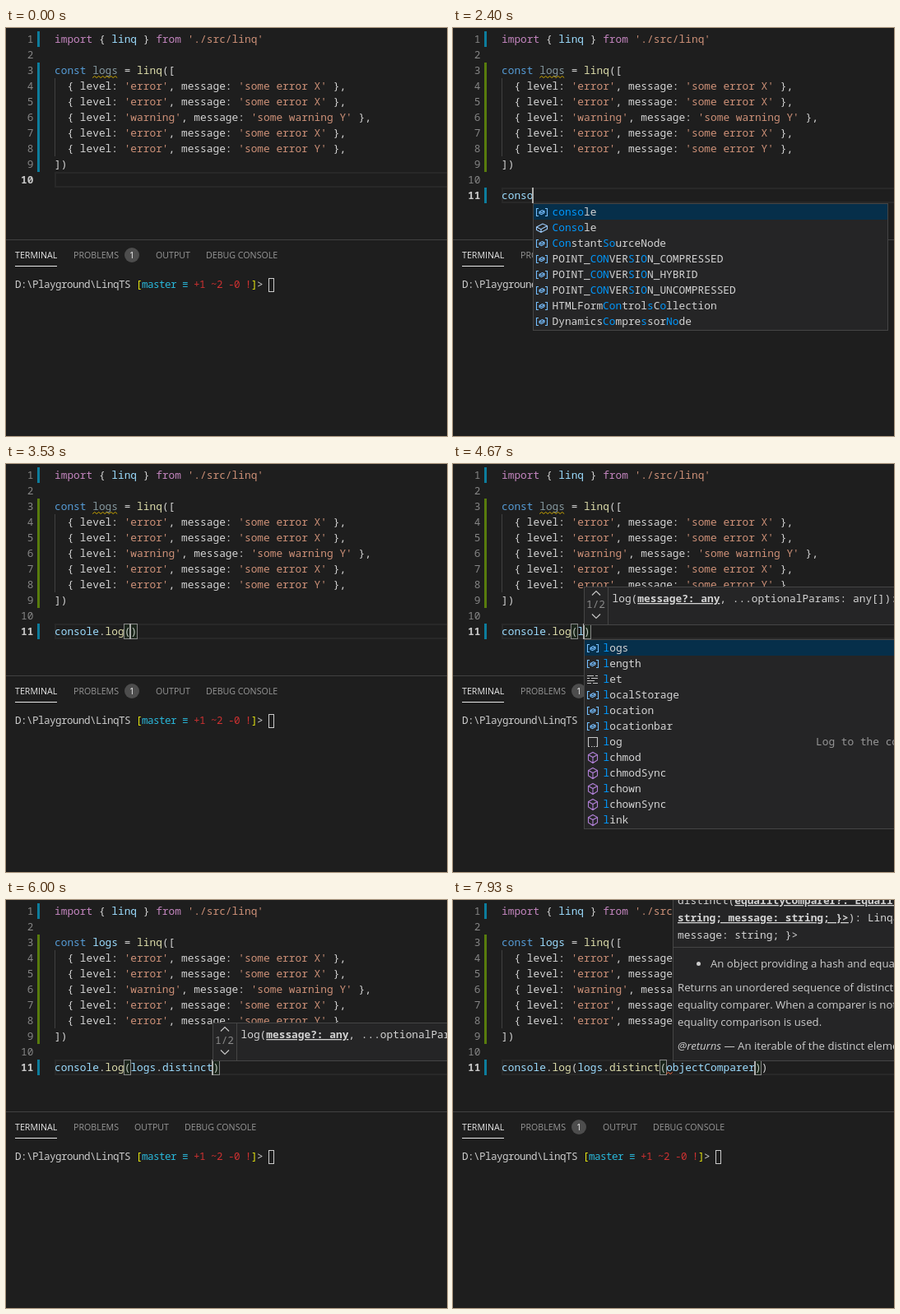
These frames come from a looping animation (536 px wide and 496 px high, 8000 ms). An HTML page:

```html
<!DOCTYPE html>
<html lang="en">
<head>
<meta charset="utf-8">
<title>Editor demo</title>
<style>
html, body { margin: 0; width: 100%; height: 100%; overflow: hidden; background: #1e1e1e; }
svg { display: block; }
text { white-space: pre; font: 12.83px "Noto Sans Mono", "DejaVu Sans Mono", monospace; fill: #d4d4d4; }
.num { fill: #858585; text-anchor: end; }
.num.on { fill: #c6c6c6; font-weight: 700; }
.import { fill: #c586c0; }
.const { fill: #569cd6; }
.str { fill: #ce9178; }
.fn { fill: #dcdcaa; }
.name { fill: #9cdcfe; }
.dim { fill: #85989f; }
.tab { font: 10.65px "Open Sans", "Noto Sans", sans-serif; fill: #979797; }
.tab.on { fill: #e7e7e7; }
.badge { font: 10px "Open Sans", "Noto Sans", sans-serif; fill: #fff; text-anchor: middle; }
.term { font-size: 12.6px; letter-spacing: -.56px; fill: #ccc; }
.y { fill: #e5e510; }
.c { fill: #29b8db; }
.r { fill: #cd3131; }
.hit { fill: #0097fb; }
.note { fill: #969696; }
.count { fill: #8a8a8a; text-anchor: middle; }
.param { font-weight: 700; text-decoration: underline; }
.doc { font: 13.2px "Open Sans", "Noto Sans", sans-serif; fill: #ccc; }
.em { font-style: italic; }
.box { fill: #252526; stroke: #454545; }
.rule { fill: none; stroke: #454545; }
.icon { fill: none; stroke-width: 1.1; }
</style>
</head>
<body>
<svg id="stage" width="536" height="496" viewBox="0 0 536 496"></svg>
<script>
const LOOP = 8000, LEFT = 59, CW = 7.698, ROW = 19;

const source = [
  "import { linq } from './src/linq'",
  "",
  "const logs = linq([",
  "  { level: 'error', message: 'some error X' },",
  "  { level: 'error', message: 'some error X' },",
  "  { level: 'warning', message: 'some warning Y' },",
  "  { level: 'error', message: 'some error X' },",
  "  { level: 'error', message: 'some error Y' },",
  "])",
  ""
];

// First letter is the icon kind; brackets force the highlighted letters.
const lists = {
  globals: "kconst kcontinue vconsole iConsole mconfirm kclass kcase kcatch v[Con]stant[So]urceNode " +
    "vPOINT_CONVERSION_COMPRESSED vPOINT_CONVERSION_HYBRID vPOINT_CONVERSION_UNCOMPRESSED " +
    "vHTMLFormControlsCollection vDynamics[Co]mpre[s]sor[No]de",
  console: "mlog massert mclear mcount mdebug mdir mdirxml merror mgroup mgroupCollapsed minfo mtable",
  locals: "vlogs vlength klet vlocalStorage vlocation vlocationbar slog mlchmod mlchmodSync mlchown mlchownSync mlink",
  linq: "mdistinct mdistinctBy mlastOrDefault mfirstOrDefault mindexOf morderBy morderByDescending " +
    "mfindIndex mfindLastIndex mwindowed mappend mlastIndexOf",
  objects: "vobjectComparer vObject vonabort vonblur vonclick vonerror vonload mopen vorigin vouterHeight vouterWidth kof"
};

const icons = {
  v: ["#75beff", "M4 3.5H1.5v9H4M12 3.5h2.5v9H12M5 7.5l3.5-2L11 6.700v2l-3.5 2L5 9.500zM5 7.500l2.500 1.200L11 6.700"],
  i: ["#9fcfff", "M1.5 7L9 3l5.500 2.500v4L7 13.500l-5.500-3zM1.500 7L7 9.700l7.500-4.200M7 9.700v3.800"],
  m: ["#b180d7", "M8 1.5l5.5 3V11L8 14.500 2.500 11V4.500zM2.500 4.500L8 7.500l5.500-3M8 7.500v7"],
  k: ["#c5c5c5", "M1 3.5h8M11 3.5h3M1 6.5h3M6 6.5h8M1 9.5h9M1 12.5h5M8 12.5h6"],
  s: ["#c5c5c5", "M2.5 13V2.5h11V13M2 13.5h2M6 13.5h1.5M9 13.5h1.5M12 13.5h2"]
};

// Each step changes part of the state from its time on.
const steps = [
  [0, { line: 10, text: "", caret: false, saved: true, unused: true, badge: true, list: "", sig: "", at: 0, pair: false, bad: false }],
  [870, { caret: true }],
  [1330, { caret: false }],
  [1530, { line: 11, caret: true }],
  [1670, { saved: false }],
  [1930, { text: "c" }],
  [2000, { list: "globals" }],
  [2070, { text: "co" }],
  [2200, { text: "con" }],
  [2330, { text: "cons" }],
  [2400, { text: "conso" }],
  [2470, { text: "consol" }],
  [2600, { text: "console" }],
  [2730, { text: "console.", list: "console" }],
  [2870, { text: "console.l" }],
  [2930, { text: "console.lo" }],
  [3070, { text: "console.log" }],
  [3200, { text: "console.log(", list: "" }],
  [3470, { pair: true }],
  [3600, { sig: "log" }],
  [4000, { caret: false }],
  [4200, { caret: true }],
  [4470, { text: "console.log(l" }],
  [4600, { list: "locals" }],
  [4800, { text: "console.log(lo" }],
  [4930, { text: "console.log(log" }],
  [5130, { text: "console.log(logs" }],
  [5330, { unused: false, badge: false }],
  [5470, { text: "console.log(logs.", list: "linq" }],
  [5600, { text: "console.log(logs.d" }],
  [5730, { text: "console.log(logs.di" }],
  [5800, { text: "console.log(logs.dis" }],
  [5930, { text: "console.log(logs.distinct", list: "" }],
  [6270, { text: "console.log(logs.distinct(", sig: "" }],
  [6670, { sig: "distinct", at: 26 }],
  [7200, { text: "console.log(logs.distinct(o", at: 27 }],
  [7270, { list: "objects" }],
  [7330, { text: "console.log(logs.distinct(ob" }],
  [7400, { text: "console.log(logs.distinct(obj" }],
  [7670, { text: "console.log(logs.distinct(objectComparer", list: "" }],
  [7870, { badge: true, bad: true }]
];

const esc = s => s.replace(/&/g, "&amp;").replace(/</g, "&lt;");
const span = (cls, s) => `<tspan class="${cls}">${esc(s)}</tspan>`;
const text = (x, y, body, cls = "") => `<text x="${x}" y="${y}" class="${cls}">${body}</text>`;
const rect = (x, y, w, h, attrs) => `<rect x="${x}" y="${y}" width="${w}" height="${h}" ${attrs}/>`;
const path = (d, attrs) => `<path d="${d}" ${attrs}/>`;
const colX = n => LEFT + n * CW;
const lineY = line => 4 + (line - 1) * ROW;

function paint(code) {
  const token = /('[^']*')|\b(import|from)\b|\b(const)\b|(\w+)(?=\()|\w+(?=:)|(\w+)|[^\w']+/g;
  return code.replace(token, (s, str, imp, decl, fn, name) => {
    const cls = str ? "str" : imp ? "import" : decl ? "const" : fn ? "fn" : name ? "name" : "";
    return cls ? span(cls, s) : esc(s);
  });
}

function squiggle(x, y, w, color) {
  let d = `M${x} ${y + 2.5}`;
  for (let i = 1; i * 2.5 <= w; i++) d += `l2.5 ${i % 2 ? -2 : 2}`;
  return path(d, `fill="none" stroke="${color}"`);
}

function editor(s) {
  const y = lineY(s.line);
  const lines = s.line > 10 ? [...source, s.text + ")".repeat(s.text.split("(").length - 1)] : source;
  const bar = (first, last, color) => rect(38, lineY(first), 3, (last - first + 1) * ROW, `fill="${color}"`);
  let out = rect(LEFT + 1, y + 1, 490, ROW - 2, 'fill="none" stroke="#282828" stroke-width="2"');
  out += bar(1, 1, "#0c7d9d") + bar(3, 9, s.saved ? "#0c7d9d" : "#587c0c");
  if (!s.saved) out += bar(11, 11, "#0c7d9d");
  out += rect(LEFT, lineY(4), 1, ROW * 5, 'fill="#404040"');

  lines.forEach((code, i) => {
    const base = lineY(i + 1) + 14;
    let body = paint(code);
    if (i === 2 && s.unused) body = body.replace('"name">logs', '"dim">logs');
    out += text(33.5, base, i + 1, i + 1 === s.line ? "num on" : "num") + text(LEFT, base, body);
  });
  if (s.unused) out += squiggle(colX(6), 58, 30, "#cca700");

  const n = s.text.length;
  if (s.pair) for (const k of [s.text.lastIndexOf("("), n])
    out += rect(Math.floor(colX(k)) + .5, y + .5, 8, 18, 'fill="rgba(0,100,0,.1)" stroke="#888"');
  if (s.bad) out += squiggle(colX(26), y + 15, 7.7, "#f1683c");
  if (s.caret) out += rect(Math.round(colX(n)) - (n ? 1 : 0), y, 2, ROW, 'fill="#aeafad"');
  return out;
}

function panel(s) {
  const shift = s.badge ? 26 : 0;
  let out = rect(0, 257, 536, 1, 'fill="#414141"') + rect(11, 289, 51, 1, 'fill="#e7e7e7"') +
    text(11, 280, "TERMINAL", "tab on") + text(82, 280, "PROBLEMS", "tab") +
    text(156 + shift, 280, "OUTPUT", "tab") + text(217 + shift, 280, "DEBUG CONSOLE", "tab");
  if (s.badge) out += '<circle cx="153" cy="276" r="9" fill="#4d4d4d"/>' + text(153, 279.5, "1", "badge");
  return out + text(11, 316, "D:\\Playground\\LinqTS " + span("y", "[") + span("c", "master ≡") +
    span("r", " +1 ~2 -0 !") + span("y", "]") + "&gt;", "term") +
    rect(319.5, 304.5, 6, 16, 'fill="none" stroke="#ccc"');
}

// Marks the query's letters in a name, or returns "" when it does not match.
function mark(name, query) {
  if (name.includes("[")) {
    const hits = name.match(/\[\w+\]/g).join("").replace(/[\[\]]/g, "");
    return hits.length < query.length ? "" : name.replace(/\[(\w+)\]/g, (_, h) => span("hit", h));
  }
  let k = 0, out = "";
  for (const ch of name) {
    const hit = k < query.length && ch.toLowerCase() === query[k];
    if (hit) k++;
    out += hit ? span("hit", ch) : ch;
  }
  return k === query.length ? out.replace(/<\/tspan><tspan class="hit">/g, "") : "";
}

function popup(s) {
  const query = s.text.match(/\w*$/)[0];
  const rows = lists[s.list].split(" ")
    .map(item => [item[0], mark(item.slice(1), query)])
    .filter(row => row[1]).slice(0, 12);
  const x = Math.round(colX(s.text.length));
  let out = rect(x + .5, 213.5, 431, rows.length * ROW + 2, 'class="box"') +
    rect(x + 1, 214, 430, ROW, 'fill="#062f4a"');
  rows.forEach(([kind, body], i) => {
    const y = 214 + i * ROW, [color, d] = icons[kind];
    out += path(d, `class="icon" stroke="${color}" transform="translate(${x + 3} ${y + 2})"`) +
      text(x + 23.5, y + 14, body);
    if (kind === "s") out += text(x + 282, y + 14, "Log to the console", "note");
  });
  return out;
}

function logHint(x) {
  const chevron = (y, dy) => path(`M${x + 10} ${y}l5 ${dy}l5 ${-dy}`, 'fill="none" stroke="#c5c5c5" stroke-width="1.2"');
  return rect(x + .5, 149.5, 500, 46, 'class="box"') + path(`M${x + 29.5} 150v45`, 'class="rule"') +
    chevron(159.5, -5) + chevron(182.5, 5) + text(x + 14.5, 175, "1/2", "count") +
    text(x + 34.5, 168, "log(" + span("param", "message?: any") + ", ...optionalParams: any[]): void");
}

function distinctHint(x) {
  const tx = x + 6;
  return rect(x + .5, -20.5, 500, 216, 'class="box"') + path(`M${x + 1} 57.5h500`, 'class="rule"') +
    text(tx, 5, "distinct(" + span("param", "equalityComparer?: EqualityComparer<{ level:")) +
    text(tx, 26, span("param", "string; message: string; }>") + "): Linqable&lt;{ level: string;") +
    text(tx, 47, "message: string; }&gt;") +
    `<circle cx="${x + 31.5}" cy="77.5" r="2.5" fill="#ccc"/>` +
    text(x + 46, 82, "An object providing a hash and equality function", "doc") +
    text(tx, 111, "Returns an unordered sequence of distinct elements using", "doc") +
    text(tx, 132, "equality comparer. When a comparer is not provided", "doc") +
    text(tx, 153, "equality comparison is used.", "doc") +
    text(tx, 182, span("em", "@returns") + " — An iterable of the distinct elements", "doc");
}

function render(s) {
  let out = editor(s) + panel(s);
  if (s.sig === "log") out += logHint(Math.floor(colX(s.text.length)));
  if (s.sig === "distinct") out += distinctHint(Math.round(colX(s.at)));
  if (s.list) out += popup(s);
  return out;
}

const stage = document.getElementById("stage");
const start = performance.now();
let shown = 0;

function tick() {
  const t = (performance.now() - start) % LOOP;
  const count = steps.filter(step => step[0] <= t).length;
  if (count !== shown) {
    shown = count;
    stage.innerHTML = render(Object.assign({}, ...steps.slice(0, count).map(step => step[1])));
  }
  requestAnimationFrame(tick);
}
tick();
</script>
</body>
</html>
```
